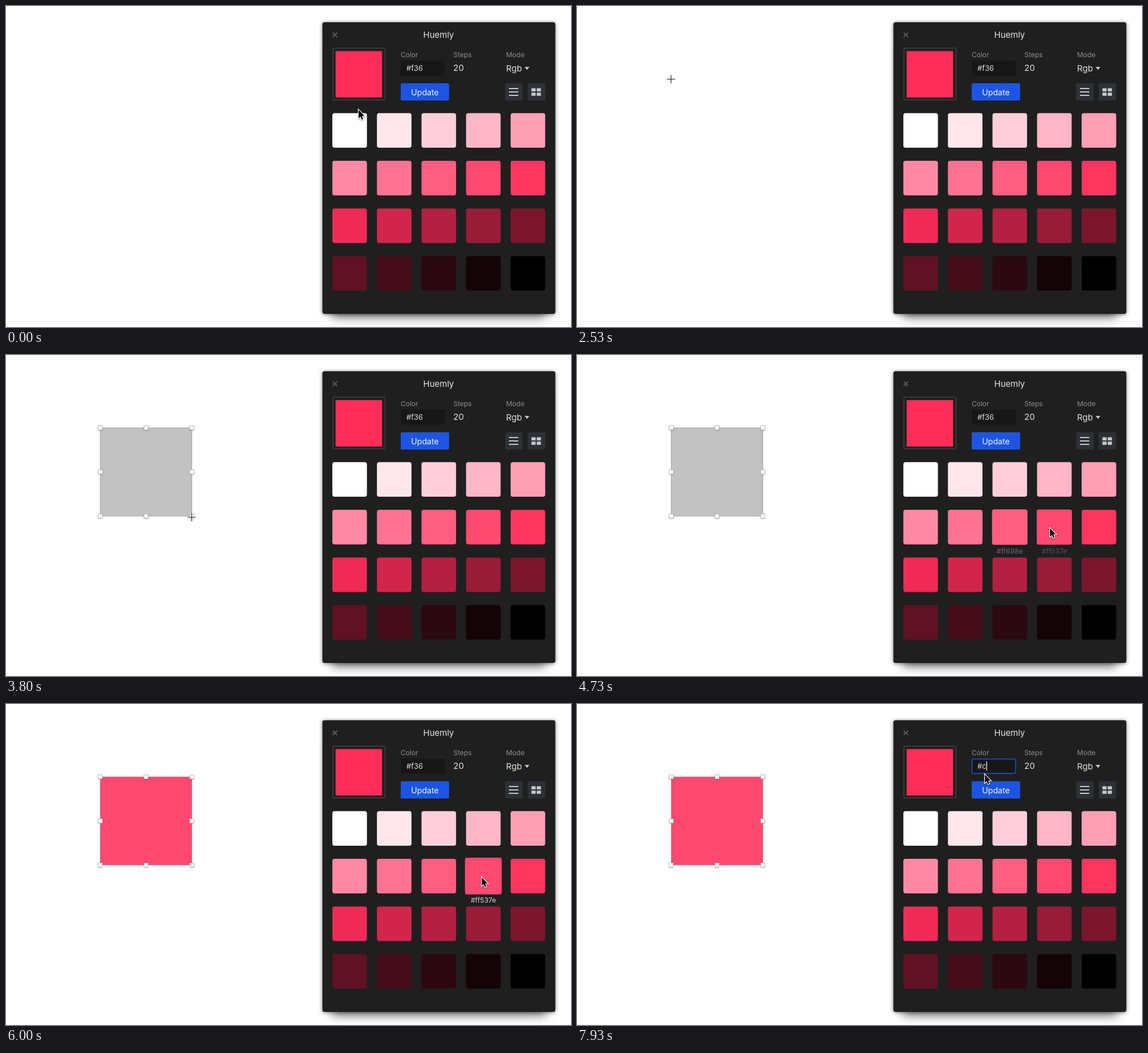
An HTML page with a canvas for the animation above (8 s loop, 992x564 px).

```html
<!DOCTYPE html>
<html lang="en">
<head>
<meta charset="utf-8">
<title>Colour panel</title>
<style>
  html, body { margin: 0; width: 100%; height: 100%; overflow: hidden; background: #fff; }
  canvas { display: block; width: 992px; height: 564px; }
</style>
</head>
<body>
<canvas id="stage"></canvas>
<script>
const W = 992, H = 564, LOOP = 8000, STEP = 1000 / 15;
const canvas = document.getElementById('stage');
const ctx = canvas.getContext('2d');
const dpr = window.devicePixelRatio || 1;
canvas.width = W * dpr;
canvas.height = H * dpr;

const HOME = { x: 619, y: 182.5 };
// Pointer moves: [from, to, x, y]
const MOVES = [
  [0, 870, 134.5, 119.5],
  [870, 1130, 132.5, 117.5],
  [1750, 2530, 165, 128.5],
  [2700, 3250, 326, 285],
  [3970, 4780, 835.3, 304.7],
  [6000, 6800, 738, 108],
  [6900, 7200, 673, 108],
  [7500, 7920, 716, 123.8]
];

const SHAPE = { x: 165.5, y: 128 };
const DRAG_START = 2700, DRAG_END = 3790, FILL_AT = 5000, FOCUS_AT = 6790;
const SELECT_AT = 6900, TYPE_AT = 7520;
const TILE = 60.7, FADE = 200, GROW = 1.9;

const clamp = v => Math.max(0, Math.min(1, v));
const ease = v => v * v * (3 - 2 * v);
const mix = (a, b, k) => a + (b - a) * k;

function pointer(t) {
  let { x, y } = HOME;
  for (const [from, to, toX, toY] of MOVES) {
    const k = ease(clamp((t - from) / (to - from)));
    x = mix(x, toX, k);
    y = mix(y, toY, k);
  }
  return { x, y };
}

// White to the base colour over ten swatches, then down to black
function swatchColor(i) {
  if (i < 10) {
    const k = i / 9, bow = Math.sin(Math.PI * k);
    return `rgb(255 ${mix(255, 53, k) - 6 * bow} ${mix(255, 96, k) - 3 * bow})`;
  }
  const k = 0.94 * ((19 - i) / 9) ** 1.13;
  return `rgb(${255 * k} ${45 * k} ${92 * k})`;
}

// Hex value written under a light swatch
function hexName(i) {
  const hex = v => Math.round(v).toString(16).padStart(2, '0');
  return '#ff' + hex(255 - 21.5 * i) + hex(255 - 16.13 * i);
}

const tileAt = i => ({ x: 573 + 78.25 * (i % 5), y: 188.3 + 83.7 * Math.floor(i / 5) });

// Share of the last FADE ms that the pointer spent on a tile
function hoverAmount({ x, y }, t) {
  const samples = 20;
  let hits = 0;
  for (let n = 0; n < samples; n++) {
    const p = pointer(t - FADE * n / samples);
    if (p.x > x && p.x < x + TILE && p.y > y && p.y < y + TILE) hits++;
  }
  return ease(hits / samples);
}

function box(x, y, w, h, color, r = 0) {
  ctx.beginPath();
  ctx.roundRect(x, y, w, h, r);
  ctx.fillStyle = color;
  ctx.fill();
}

function frame(x, y, w, h, color, width, r = 0) {
  ctx.beginPath();
  ctx.roundRect(x, y, w, h, r);
  ctx.strokeStyle = color;
  ctx.lineWidth = width;
  ctx.stroke();
}

function lines(color, width, ...segments) {
  ctx.beginPath();
  for (const [x0, y0, x1, y1] of segments) {
    ctx.moveTo(x0, y0);
    ctx.lineTo(x1, y1);
  }
  ctx.strokeStyle = color;
  ctx.lineWidth = width;
  ctx.stroke();
}

function polygon(points) {
  ctx.beginPath();
  points.forEach(([x, y]) => ctx.lineTo(x, y));
  ctx.closePath();
}

function text(str, x, y, size, color, align = 'left') {
  ctx.font = `${size}px Inter, sans-serif`;
  ctx.textAlign = align;
  ctx.fillStyle = color;
  ctx.fillText(str, x, y);
}

function withShadow(color, blur, dy, draw) {
  ctx.save();
  ctx.shadowColor = color;
  ctx.shadowBlur = blur * dpr;
  ctx.shadowOffsetY = dy * dpr;
  draw();
  ctx.restore();
}

function drawSwatches(t) {
  for (let i = 0; i < 20; i++) {
    const tile = tileAt(i), amount = hoverAmount(tile, t), grow = GROW * amount;
    box(tile.x - grow, tile.y - grow, TILE + grow * 2, TILE + grow * 2, swatchColor(i), 4);
    if (amount > 0) {
      ctx.globalAlpha = amount;
      text(hexName(i), tile.x + TILE / 2, tile.y + 77.2, 12.2, '#d4d4d4', 'center');
      ctx.globalAlpha = 1;
    }
  }
}

function drawField(t) {
  const focused = t >= FOCUS_AT, selecting = t >= SELECT_AT && t < TYPE_AT;
  box(693, 96, 77.5, 26.5, '#171717', 2);
  if (focused) frame(693.6, 96.6, 76.4, 25.4, '#1f5ae6', 1.3, 2);

  const value = t < TYPE_AT ? '#f36' : '#c'.slice(0, 1 + (t - TYPE_AT) / 270);
  ctx.font = '13px Inter, sans-serif';
  const end = 703 + ctx.measureText(value).width;
  if (selecting) {
    const from = Math.max(703, Math.min(end, pointer(t).x));
    box(from, 101, end - from, 16, '#47699a');
  }
  text(value, 703, 113.5, 13, '#dedede');
  if (focused && !selecting) lines('#fff', 1.2, [end + 0.7, 101, end + 0.7, 117]);
}

function drawHeader(t) {
  lines('#595959', 2, [573.5, 46.7, 581.3, 54.5], [581.3, 46.7, 573.5, 54.5]);
  text('Huemly', 759.5, 56, 15, '#e6e6e6', 'center');

  frame(574, 74, 91.5, 91, '#38393c', 2, 3);
  box(578.7, 79.3, 81.6, 81.4, '#ff2d58');

  ['Color', 'Steps', 'Mode'].forEach((label, i) => text(label, 693 + 92.5 * i, 89.5, 12, '#8e8e8e'));
  drawField(t);
  text('20', 785.3, 113.5, 15, '#e2e2e2');
  text('Rgb', 878, 114.5, 15, '#e2e2e2');
  polygon([[910.5, 107], [919, 107], [914.75, 112.2]]);
  ctx.fillStyle = '#c4c4c4';
  ctx.fill();

  box(693, 135.8, 85, 30.3, '#1c55e3', 2);
  text('Update', 735.5, 156.5, 14.2, '#f4f6fd', 'center');

  for (const x of [876.4, 916]) box(x, 135.8, 30.8, 30.3, '#2f3035', 2);
  lines('#c6c7c9', 2, ...[-1, 0, 1].map(n => [883, 151 + 6 * n, 899.5, 151 + 6 * n]));
  for (const x of [922.5, 931.8])
    for (const y of [144.5, 152.2]) box(x, y, 7.4, 5.6, '#c6c7c9');
}

function drawPanel(t) {
  withShadow('rgba(0,0,0,.55)', 18, 13, () => box(572, 60, 376, 474, '#1f1f1f', 4));
  withShadow('rgba(0,0,0,.5)', 7, 1, () => box(555.5, 28.5, 409, 512.5, '#1f1f1f', 4));
  drawHeader(t);
  drawSwatches(t);
}

function drawHandles(w, h) {
  const r = 3.7;
  for (let i = 0; i < 9; i++) {
    if (i === 4) continue;
    const x = SHAPE.x + w * (i % 3) / 2 - r, y = SHAPE.y + h * Math.floor(i / 3) / 2 - r;
    withShadow('rgba(0,0,0,.3)', 2, 1, () => box(x, y, r * 2, r * 2, '#fff'));
    frame(x, y, r * 2, r * 2, '#a6a6a6', 0.8);
  }
}

function drawShape(t) {
  const end = pointer(Math.min(t, DRAG_END));
  const w = end.x + 0.3 - SHAPE.x, h = end.y - 2 - SHAPE.y;
  if (t < DRAG_START || w < 1) return;
  box(SHAPE.x, SHAPE.y, w, h, t < FILL_AT ? '#c2c2c2' : swatchColor(8));
  frame(SHAPE.x, SHAPE.y, w, h, 'rgba(130,130,130,.65)', 1);

  if (t < DRAG_END) {
    box(end.x + 11, end.y - 16, 57, 19, 'rgba(40,40,40,.75)', 3);
    text(`${Math.round(w)} × ${Math.round(h)}`, end.x + 39.5, end.y - 2.5, 10, '#fff', 'center');
  } else {
    drawHandles(w, h);
  }
}

function drawArrow() {
  polygon([[0, 0], [0, 14.8], [3.4, 11.7], [5.7, 17], [8, 16], [5.8, 10.8], [10.4, 10.6]]);
  ctx.strokeStyle = '#fff';
  ctx.lineWidth = 2.2;
  withShadow('rgba(0,0,0,.4)', 3, 1.2, () => ctx.stroke());
  ctx.fillStyle = '#000';
  ctx.fill();
}

function drawCross() {
  const arms = [[-7.3, 0, 7.3, 0], [0, -7.3, 0, 7.3]];
  lines('rgba(255,255,255,.7)', 3, ...arms);
  lines('#1a1a1a', 1.2, ...arms);
}

function drawBeam() {
  const parts = [[0, -7, 0, 7], [-3, -8, 0, -7], [3, -8, 0, -7], [-3, 8, 0, 7], [3, 8, 0, 7]];
  lines('rgba(255,255,255,.75)', 2.4, ...parts);
  lines('#111', 1, ...parts);
}

function drawPointer(t) {
  const { x, y } = pointer(t);
  const inField = x > 693 && x < 770 && y > 96 && y < 122;
  const selecting = t >= SELECT_AT && t < TYPE_AT;
  const drawing = t >= 1860 && t < FILL_AT && x < 555;
  ctx.save();
  ctx.translate(x, y);
  if (inField || selecting) drawBeam();
  else if (drawing) drawCross();
  else drawArrow();
  ctx.restore();
}

function render(t) {
  ctx.setTransform(dpr, 0, 0, dpr, 0, 0);
  ctx.fillStyle = '#fff';
  ctx.fillRect(0, 0, W, H);
  drawPanel(t);
  drawShape(t);
  drawPointer(t);
}

// The picture advances fifteen times a second
const start = performance.now();
function tick() {
  const time = (performance.now() - start) % LOOP;
  render(Math.floor((time + 5) / STEP) * STEP % LOOP);
  requestAnimationFrame(tick);
}
tick();
</script>
</body>
</html>
```
